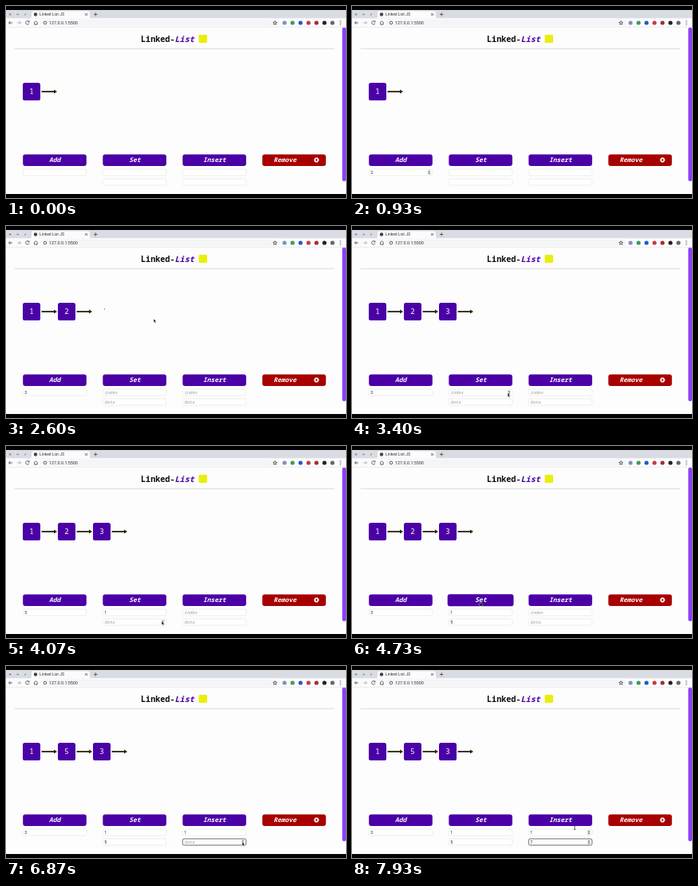
An HTML page for the animation above (8 s loop, 426 px wide and 240 px high).

```html
<!DOCTYPE html>
<html lang="en">
<head>
<meta charset="utf-8">
<title>Linked List JS</title>
<style>
  /* A registered property keeps scaled text sharp: it repaints at every size */
  @property --scale { syntax: "<number>"; inherits: false; initial-value: 1; }
  html, body { margin: 0; width: 100%; height: 100%; overflow: hidden; background: #000; }
  svg { display: block; width: 100vw; height: 100vh; }
  text { font-family: "Noto Sans Mono", "DejaVu Sans Mono", monospace; }
  .ui { font-family: Roboto, sans-serif; fill: #333; }
  .title { font-size: 10.15px; font-weight: 600; fill: #0a0a0a; }
  .title tspan { font-style: italic; fill: #4b00a6; }
  .label { font-size: 7.9px; font-weight: 600; font-style: italic; fill: #fff; text-anchor: middle; }
  .digit { font-size: 9px; font-weight: 500; fill: #fff; text-anchor: middle; }
  .hint { font-size: 5.4px; font-style: italic; fill: #999; }
  .value { font: 5.2px Roboto, sans-serif; fill: #222; }
  .field { fill: #fff; stroke: #e2e2e0; stroke-width: .6; }
  .grow { transform-box: fill-box; transform-origin: center; transform: scale(var(--scale)); }
  .line { fill: none; stroke: #444; stroke-width: .8; }
</style>
</head>
<body>
<svg viewBox="0 0 426 240" preserveAspectRatio="none">
  <rect width="426" height="240"/>
  <rect y="5" width="426" height="230" fill="#fdfdfe"/>

  <g id="chrome">
    <rect y="5" width="426" height="10.5" fill="#dadce4"/>
    <path d="M30 15.5Q32 15.5 32 13V9Q32 6.5 34 6.5H103Q105 6.5 105 9V13Q105 15.5 107 15.5Z" fill="#fbfbfd"/>
    <rect y="15.5" width="426" height="11" fill="#fbfbfd"/>
    <rect x="43" y="16.8" width="300" height="8.2" rx="4.1" fill="#f5f5f8"/>
    <path d="M0 26.5H426" stroke="#e2e2e8" stroke-width=".6"/>
    <path class="line" d="M4.2 9.5l2 2m0-2l-2 2M13.5 11.2l1.2-1.3 1.2 1.3M23.2 11.4l1.8-1.8"/>
    <circle cx="37" cy="10.5" r="2.2" fill="#444"/>
    <text class="ui" x="42" y="12.4" font-size="5">Linked List JS</text>
    <path class="line" d="M99 9l3 3m0-3l-3 3M110 10.5h4.4M112.2 8.3v4.4"/>
    <path class="line" d="M8 21H3.5l2-2m-2 2l2 2"/>
    <path class="line" d="M14 21h4.5l-2-2m2 2l-2 2" opacity=".45"/>
    <path class="line" d="M28.6 19.5a2.2 2.2 0 1 0 .3 2.2M29 18.4v1.6h-1.7"/>
    <path class="line" d="M35 21l2.4-2.2 2.4 2.2M35.7 20.8v2.4h3.4v-2.4"/>
    <circle class="line" cx="49" cy="21" r="1.8"/>
    <text class="ui" x="54" y="22.9" font-size="5.4">127.0.0.1:5500</text>
    <path class="line" d="M337 18.7l.7 1.6 1.7.1-1.3 1.1.4 1.7-1.5-.9-1.5.9.4-1.7-1.3-1.1 1.7-.1z"/>
    <g fill="#333">
      <circle cx="419" cy="18.9" r=".6"/><circle cx="419" cy="21" r=".6"/><circle cx="419" cy="23.1" r=".6"/>
    </g>
  </g>

  <rect x="421.3" y="27" width="4.7" height="192" rx="2" fill="#8b40f4"/>

  <text class="title" x="169" y="44.8">Linked-<tspan>List</tspan></text>
  <rect x="241.5" y="36" width="10.5" height="10" rx="1.5" fill="#e9ee0c"/>
  <path d="M11 53.3H411" stroke="#d3d3d8" stroke-width=".8"/>

  <g id="list"></g>
  <g id="forms"></g>

  <g id="cursor">
    <path id="arrow" d="M0 0V4.6L1.1 3.6 1.9 5.4 2.7 5 1.9 3.4H3.3Z" fill="#111" stroke="#fff" stroke-width=".35"/>
    <path id="hand" d="M-.6-1.5Q0-2.2.6-1.5V.4L2.4.9Q3 1.2 2.8 2.2L2.2 4H-.9L-2.2 1.7Q-2 .9-.6 1.7Z" fill="#111" stroke="#fff" stroke-width=".35"/>
    <path id="beam" d="M-1-2.4H1M0-2.4V2.4M-1 2.4H1" fill="none" stroke="#222" stroke-width=".7"/>
  </g>
</svg>

<script>
const LOOP = 8000;
const $ = id => document.getElementById(id);
const add = (id, markup) => $(id).insertAdjacentHTML('beforeend', markup);

// keys: [time in ms, value]; the ends are held to fill the loop
function play(id, prop, keys, easing = 'ease-in-out') {
  const all = [[0, keys[0][1]], ...keys, [LOOP, keys[keys.length - 1][1]]];
  $(id).animate(all.map(([t, v]) => ({ offset: t / LOOP, [prop]: v, easing })),
    { duration: LOOP, iterations: Infinity });
}

// Visible only inside the given [from, to] spans
function show(id, ...spans) {
  play(id, 'opacity', [[0, 0], ...spans.flatMap(([a, b = LOOP]) => [[a, 1], [b, 0]])], 'step-end');
}

const grow = (id, start, length) =>
  play(id, '--scale', [[start, 0], [start + length, 1]]);

const hover = (id, ...spans) => play(id, '--scale', spans.flatMap(([a, b]) => [
  [a, 1], [a + 200, 1.04], [b, 1.04], [b + 200, 1]]));

['#7f93b8', '#3f9a5c', '#2857c8', '#c63a42', '#a52c2c', '#222', '#666'].forEach((color, i) =>
  add('chrome', `<circle cx="${349 + i * 10}" cy="21" r="2.6" fill="${color}"/>`));

for (let i = 0; i < 3; i++) {
  const x = 21 + i * 44;
  const digit = (id, n) => `<text id="${id}" class="digit" x="${x + 11}" y="110.3">${n}</text>`;
  add('list', `
    <g id="node${i}" class="grow">
      <rect x="${x}" y="96" width="22" height="22" rx="2.6" fill="#4b00a6"/>
      ${digit('digit' + i, i + 1)}${i === 1 ? digit('changed', 5) : ''}
    </g>
    <g id="link${i}" class="grow">
      <path d="M${x + 23.5} 107h17" stroke="#2b2208" stroke-width="1.8"/>
      <path d="M${x + 39} 104.6l4 2.4-4 2.4z" fill="#2b2208"/>
    </g>`);
}

function button(name, x, color = '#4b00a6') {
  const isRemove = name === 'Remove';
  const gear = `<circle cx="389" cy="192.5" r="2" fill="none" stroke="#fff" stroke-width="1.5"/>
    <circle cx="389" cy="192.5" r="2.9" fill="none" stroke="#fff" stroke-width="1" stroke-dasharray="1.14"/>`;
  add('forms', `<g id="${name}" class="grow">
    <rect x="${x}" y="185.5" width="79.6" height="14.5" rx="3" fill="${color}"/>
    <text class="label" x="${isRemove ? 349.5 : x + 40}" y="195.2">${name}</text>
    ${isRemove ? gear : ''}</g>`);
}

function field(id, x, y, hint, values) {
  const text = (key, kind, s) => `<text id="${key}" class="${kind}" x="${x + 2}" y="${y + 5.8}">${s}</text>`;
  add('forms', `<rect class="field" x="${x}" y="${y}" width="79.5" height="8" rx="2"/>
    <rect id="${id}Focus" x="${x}" y="${y}" width="79.5" height="8" rx="2" fill="none" stroke="#444" stroke-width=".7" opacity="0"/>
    ${text(id + 'Hint', 'hint', hint)}
    ${values.map(([n], i) => text(id + i, 'value', n)).join('')}
    <g id="${id}Spin" opacity="0">
      <rect x="${x + 73.5}" y="${y + 1}" width="4" height="6" fill="#e6e6e6"/>
      <path d="M${x + 74.3} ${y + 3.3}l1.2-1.4 1.2 1.4zm0 1.5l1.2 1.4 1.2-1.4z" fill="#444"/>
    </g>`);
  show(id + 'Hint', [0, values[0][1]]);
  values.forEach(([, from, to], i) => show(id + i, [from, to]));
}

button('Add', 21.2);
button('Set', 121.3);
button('Insert', 221.3);
button('Remove', 321.2, '#a80000');

field('addData', 21.2, 204, 'data', [[2, 800, 1950], [3, 1950]]);
field('setIndex', 121.3, 204, 'index', [[1, 3670]]);
field('setData', 121.3, 216, 'data', [[5, 4270]]);
field('insIndex', 221.3, 204, 'index', [[1, 6330]]);
field('insData', 221.3, 216, 'data', [[7, 7130]]);

show('addDataSpin', [530, 1130], [1730, 2070]);
show('setIndexSpin', [3270, 3870]);
show('setDataSpin', [3870, 4530]);
show('insIndexSpin', [5670, 6670], [7670]);
show('insDataSpin', [6670]);
show('insDataFocus', [6800]);

grow('node1', 1470, 330);
grow('link1', 1670, 330);
grow('node2', 2550, 330);
grow('link2', 2800, 330);
show('digit1', [0, 5070]);
show('changed', [5070]);

hover('Add', [1130, 1530], [2070, 2270]);
hover('Set', [4500, 5130]);

play('cursor', 'transform', [
  [0, 49, 188], [100, 50, 189], [600, 92, 207], [800, 96, 207], [950, 96, 207],
  [1250, 72, 194], [1500, 72, 194], [1750, 96, 207], [1980, 96, 207],
  [2130, 80, 194], [2270, 82, 192], [2580, 185, 116], [2700, 185, 116],
  [3300, 195, 209], [3800, 195, 208], [4000, 195, 219], [4370, 195, 219],
  [4650, 161, 196], [5000, 161, 196], [5700, 256, 207], [5850, 258, 207],
  [6150, 296, 208], [6600, 296, 208], [6850, 296, 220], [7400, 296, 220],
  [7900, 279, 202]
].map(([t, x, y]) => [t, `translate(${x}px, ${y}px)`]));

show('hand', [0, 330], [730, 1600], [2070, 2300], [4500, 5200]);
show('beam', [330, 730], [5600, 6070], [7530]);
show('arrow', [1600, 2070], [2300, 4500], [5200, 5600], [6070, 7530]);
</script>
</body>
</html>
```
